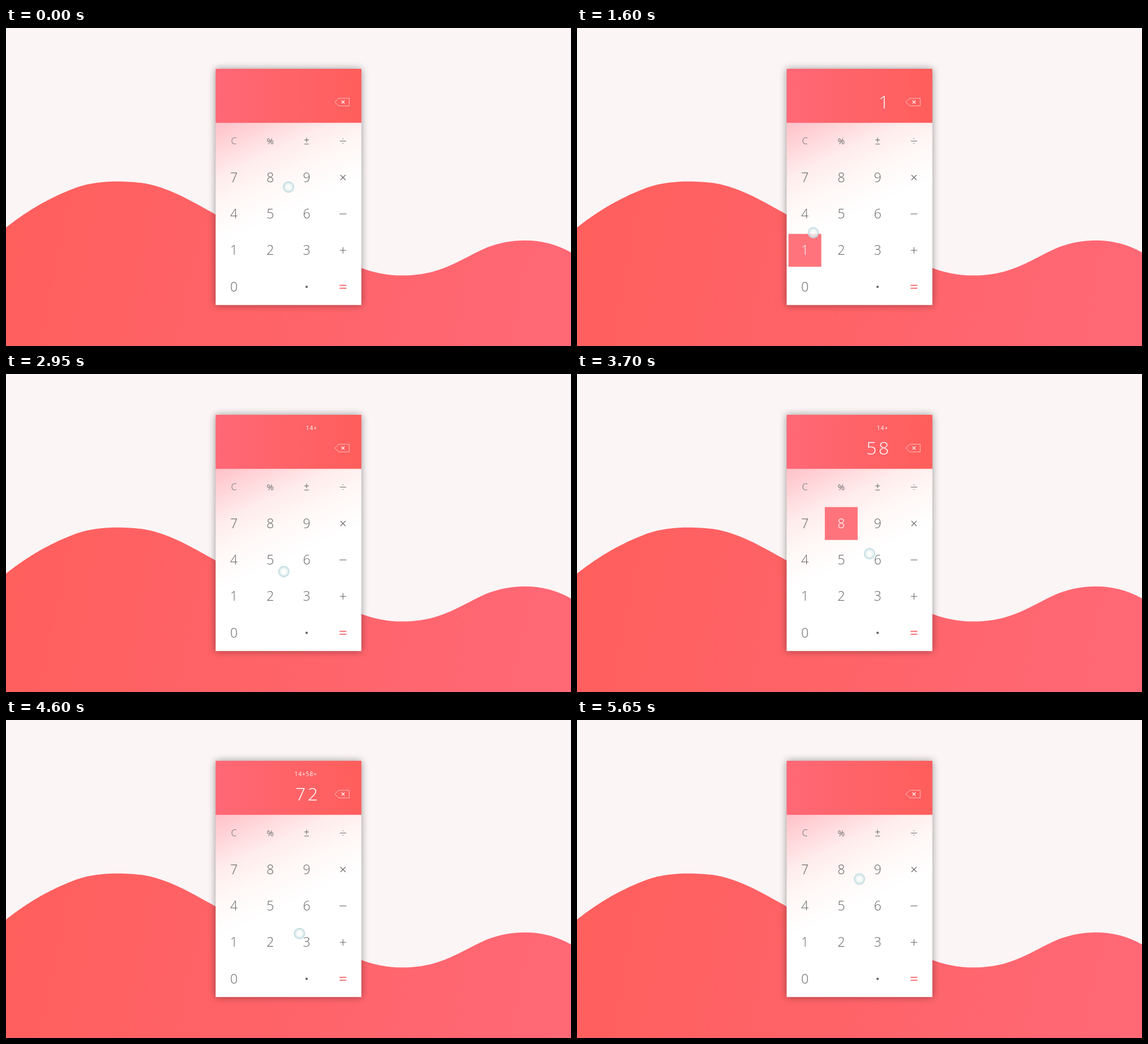
Animation of 998x561 px, one loop 6.65 s. Source, as an HTML page:

```html
<!DOCTYPE html>
<html lang="en">
<head>
<meta charset="utf-8">
<title>Calculator</title>
<style>
html, body { margin: 0; width: 100%; height: 100%; overflow: hidden; background: #fbf5f5; }
svg { display: block; width: 100vw; height: 100vh; }
text { font-family: "Open Sans", "Noto Sans", sans-serif; font-weight: 300; }
.key { color: #666; }
.key text { fill: currentColor; text-anchor: middle; }
.key path { stroke: currentColor; stroke-width: 1.1; fill: none; }
.key.equals { color: #f4686b; }
.key.equals path { stroke-width: 1.7; }
.key rect { fill: #ff747c; visibility: hidden; }
.key.on { color: #fff; }
.key.on rect { visibility: visible; }
.out { fill: #fff; text-anchor: end; }
</style>
</head>
<body>
<svg id="stage" viewBox="0 0 998 561" xmlns="http://www.w3.org/2000/svg">
  <defs>
    <linearGradient id="wave" gradientUnits="userSpaceOnUse" x1="0" y1="370" x2="960" y2="560">
      <stop offset="0" stop-color="#ff5f5d"/><stop offset="1" stop-color="#ff6875"/>
    </linearGradient>
    <linearGradient id="head">
      <stop offset="0" stop-color="#ff6876"/><stop offset="1" stop-color="#ff5e5b"/>
    </linearGradient>
    <linearGradient id="pad" gradientUnits="userSpaceOnUse" x1="370" y1="167" x2="454" y2="347">
      <stop offset="0" stop-color="#ffc1c8"/><stop offset=".2" stop-color="#ffd4d8"/>
      <stop offset=".45" stop-color="#ffecec"/><stop offset=".7" stop-color="#fff8f7"/>
      <stop offset="1" stop-color="#fff"/>
    </linearGradient>
    <radialGradient id="drop">
      <stop offset="0" stop-color="#fff" stop-opacity=".85"/>
      <stop offset=".5" stop-color="#f3f7f7" stop-opacity=".8"/>
      <stop offset=".8" stop-color="#cbe2e6" stop-opacity=".85"/>
      <stop offset="1" stop-color="#b2d2da" stop-opacity=".9"/>
    </radialGradient>
    <filter id="blur" x="-20%" y="-20%" width="140%" height="140%"><feGaussianBlur stdDeviation="7"/></filter>
  </defs>
  <rect width="998" height="561" fill="#fbf5f5"/>
  <path fill="url(#wave)" d="M0 352C40 320 82 297 124 281.5C164 267.5 210 270 238 273C290 280 333 309 380 334L620 420C660 438 700 439 735 434C780 427 815 402 850 387C900 368 955 371 998 396V561H0Z"/>
  <rect x="370" y="72" width="258" height="417" fill="#000" opacity=".38" filter="url(#blur)"/>
  <rect x="370.3" y="167" width="257.4" height="321.7" fill="url(#pad)"/>
  <rect x="370.3" y="72" width="257.4" height="95.3" fill="url(#head)"/>
  <text id="history" class="out" x="550" y="98.7" font-size="10" letter-spacing="1" style="font-weight:400"></text>
  <text id="value" class="out" x="554.5" y="142.3" font-size="32" letter-spacing="3.5"></text>
  <g fill="none" stroke="#fff">
    <path d="M580.5 130.7L588 124H606.2V137.4H588Z" stroke-opacity=".6"/>
    <path d="M592.6 128L598 133.4M598 128L592.6 133.4" stroke-width="1.2"/>
  </g>
  <g id="keys"></g>
  <circle id="cursor" r="10" fill="url(#drop)"/>
</svg>
<script>
const $ = id => document.getElementById(id);
const START = 1000, STEP = 150, LAST = 32, LOOP = 6650;
const PITCH = 64.25, LEFT = 402.5, TOP = 199.5;
const rows = ["C%±÷", "789×", "456−", "123+", "0 .="];

// Signs drawn around the centre of their key
const signs = {
  "±": "M-4 -2H4M0 -6V2M-4 5.3H4",
  "÷": "M-5.5 0H5.5M-.8 -4H.8M-.8 4H.8",
  "×": "M-4.5 -4.5L4.5 4.5M4.5 -4.5L-4.5 4.5",
  "−": "M-6 0H6",
  "+": "M-5.7 0H5.7M0 -5.7V5.7",
  "=": "M-6 -2.7H6M-6 2.7H6"
};
const keys = {};

function face(label) {
  if (signs[label]) return `<path d="${signs[label]}"/>`;
  if (label === ".") return '<circle cy=".2" r="2.1" fill="currentColor"/>';
  const size = label === "C" ? 16.5 : label === "%" ? 15 : 23;
  const weight = label === "%" ? 400 : 300;
  return `<text y="${size * 0.357}" font-size="${size}" style="font-weight:${weight}">${label}</text>`;
}

rows.forEach((row, r) => [...row].forEach((label, c) => {
  if (label === " ") return;
  const key = document.createElementNS("http://www.w3.org/2000/svg", "g");
  key.setAttribute("class", label === "=" ? "key equals" : "key");
  key.setAttribute("transform", `translate(${LEFT + c * PITCH} ${TOP + r * PITCH})`);
  key.innerHTML = '<rect x="-29" y="-29" width="58" height="58"/>' + face(label);
  $("keys").append(key);
  keys[label] = key;
}));

// Each press: step, key, value, history
const presses = [
  [4, "1", "1", ""],
  [7, "4", "14", ""],
  [12, "+", "", "14+"],
  [16, "5", "5", "14+"],
  [18, "8", "58", "14+"],
  [23, "=", "72", "14+58="],
  [29, "C", "", ""]
];

// Each move: first step, last step, end point, optional bend
const home = [499, 280.5];
const moves = [
  [0, 4, [417.5, 407]],
  [4, 5.4, [417.5, 343]],
  [7, 11, [580.5, 407]],
  [12, 14.22, [481.5, 343], [528, 370]],
  [16, 17.5, [481.5, 279]],
  [18.1, 22.65, [580.5, 471], [580.5, 375]],
  [22.75, 28.75, [417.5, 214], [497, 347]],
  [29, 31.4, home]
];

function cursorAt(step) {
  let from = home;
  for (const [a, b, to, bend] of moves) {
    if (step <= a) return from;
    if (step < b) {
      const t = (step - a) / (b - a);
      return from.map((p, i) => {
        const q = bend ? bend[i] : (p + to[i]) / 2;
        return (1 - t) * (1 - t) * p + 2 * t * (1 - t) * q + t * t * to[i];
      });
    }
    from = to;
  }
  return from;
}

function draw(time) {
  const t = time % LOOP;
  const step = t < START ? 0 : Math.min(LAST, Math.floor((t - START) / STEP) + 1);
  let active = "", value = "", history = "";
  for (const [at, label, v, h] of presses) {
    if (step < at) break;
    active = step < at + 2 ? label : "";
    value = v;
    history = h;
  }
  for (const label in keys) keys[label].classList.toggle("on", label === active);
  $("value").textContent = value;
  $("history").textContent = history;
  const [x, y] = cursorAt(step);
  $("cursor").setAttribute("transform", `translate(${x} ${y})`);
}

const origin = performance.now();
function tick() {
  draw(performance.now() - origin);
  requestAnimationFrame(tick);
}
tick();
</script>
</body>
</html>
```
